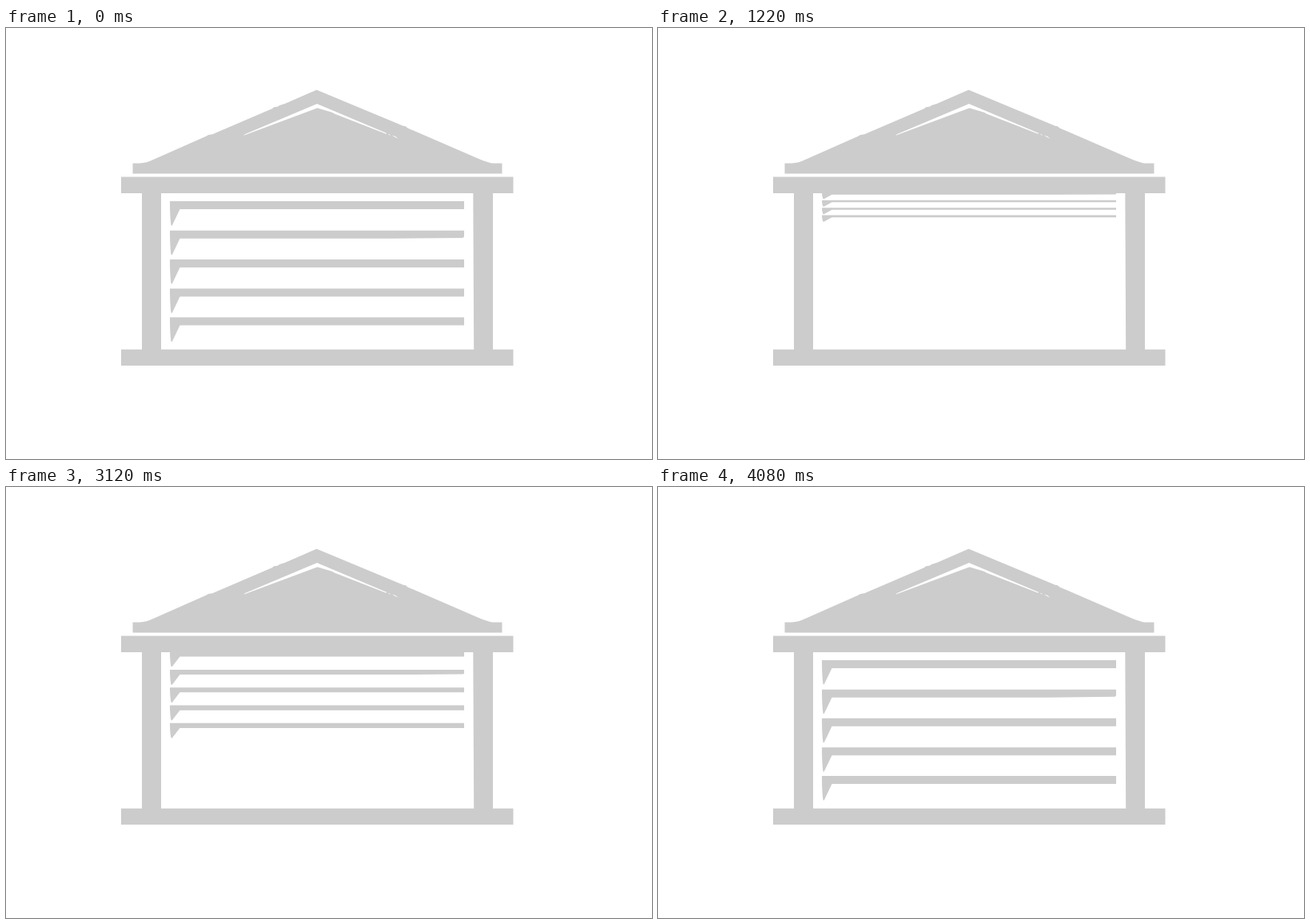
These frames come from a looping animation (808 by 540 pixels, 4100 ms). An HTML page:

```html
<!DOCTYPE html>
<html lang="en">
<head>
<meta charset="utf-8">
<title>Garage door</title>
<style>
  html, body { margin: 0; width: 100%; height: 100%; overflow: hidden; background: #fff; }
  svg { display: block; width: 808px; height: 540px; fill: #ccc; }
</style>
</head>
<body>
<svg viewBox="0 0 808 540">
  <g id="door"></g>

  <path d="M158.5 169.5H167Q176 169 184 165L250 135.7L253 134L258 133.2L333 101L335 99.2L340 98.6L342 97L349 94.7
           L388.5 77.5L497 122.7L500 123.3L502 125.2L580 159Q600 168 608 169.5H620.5V182.5H158.5Z"/>
  <g fill="#fff">
    <path d="M389 95L476 131.8L475.5 132.8L411 107.4L408 105.7L389.5 100.3L297 134.8L299 133Z"/>
    <path d="M477.5 132.6L481 134L480 134.4Z"/>
    <path d="M483 134.4L487 135.8L490.5 138.4L487 136.9Z"/>
  </g>

  <path d="M144 186.5H634.5V207H144Z"/>
  <path d="M170 206H194V404H170Z"/>
  <path d="M584.3 206H609V404H585.2Z"/>
  <path d="M144 402.7H634.5V423H144Z"/>
</svg>
<script>
  const door = document.getElementById('door');
  const PERIOD = 4100, HALF = 2050, START = 795, MOVE = 1250, STEP = 20;
  const OPEN = 0.17, PIVOT = 189.4;

  // Slats; the second one tapers slightly at its right end.
  [217, 253.8, 290, 326.5, 362.5].forEach((y, i) => {
    const end = i === 1 ? 'V7Q368 9 366 9.2L280 10' : 'V10';
    const slat = document.createElementNS('http://www.w3.org/2000/svg', 'path');
    slat.setAttribute('d', `M0 0H368${end}H12.5L3 30Q1.8 32 1.3 29Q0 18 0 0Z`);
    slat.setAttribute('transform', `translate(205 ${y})`);
    door.append(slat);
  });

  // Underdamped spring (damping ratio 0.5), cut off after MOVE ms.
  function spring(t) {
    if (t <= 0) return 0;
    if (t >= MOVE) return 1;
    const a = 0.00428 * t;
    return 1 - Math.exp(-a / Math.sqrt(3)) * (Math.cos(a) + Math.sin(a) / Math.sqrt(3));
  }

  function draw(ms) {
    const t = Math.floor((ms % PERIOD) / STEP) * STEP;
    const shut = 1 - spring(t - START) + spring(t - START - HALF);
    const s = OPEN + (1 - OPEN) * shut;
    door.setAttribute('transform', `translate(0 ${PIVOT * (1 - s)}) scale(1 ${s})`);
  }

  const t0 = performance.now();
  function loop() {
    draw(performance.now() - t0);
    requestAnimationFrame(loop);
  }
  loop();
</script>
</body>
</html>
```
